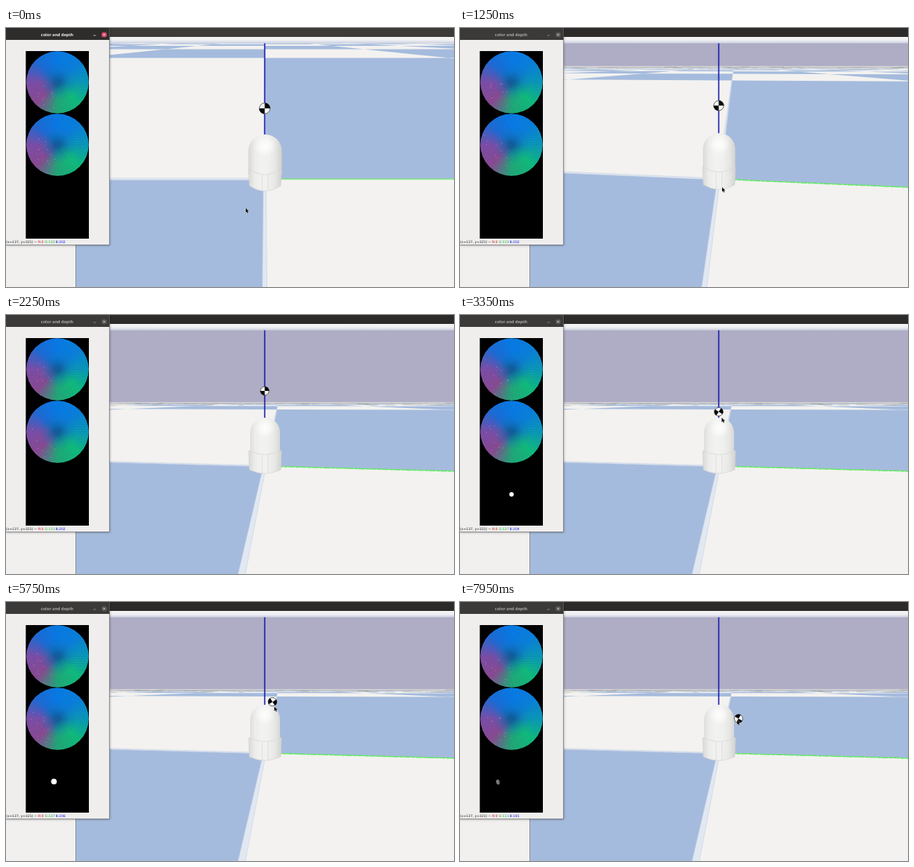
Animation, 600 px wide and 348 px high, one loop 8000 ms. Source, as an HTML page with a canvas:

```html
<!DOCTYPE html>
<html lang="en">
<head>
<meta charset="utf-8">
<title>Tactile sensor simulation</title>
<style>
html, body { margin: 0; width: 100%; height: 100%; overflow: hidden; background: #f1f0ef; }
canvas { display: block; width: 600px; height: 348px; }
</style>
</head>
<body>
<canvas id="stage" width="600" height="348"></canvas>
<script>
const LOOP = 8000, FOCAL = 230, CX = 346.5, CY = 184, GROUND = 19, TILE = 8.4;
const ctx = document.getElementById('stage').getContext('2d');

const mix = (a, b, k) => a + (b - a) * k;
const ramp = (t, from, to) => Math.min(1, Math.max(0, (t - from) / (to - from)));
const easeOut = (t, from, to, power) => 1 - (1 - ramp(t, from, to)) ** power;

// Everything that moves, as a function of time.
function pose(t) {
  const horizon = 14.7 + 45 * easeOut(t, 900, 1720, 3) + 57.5 * ramp(t, 1720, 2200);
  const tilt = (horizon - 14.7) / 102.5;
  const roll = easeOut(t, 5200, 7950, 1.4), angle = 1.5 * roll;
  const ball = {
    x: CX + 26.6 * Math.sin(angle),
    y: 108 - 6 * easeOut(t, 900, 2200, 3) + 30 * ramp(t, 2650, 3400) + 26.6 * (1 - Math.cos(angle)),
    r: 7.5 - 1.5 * tilt,
    turn: 0.6 * ramp(t, 2650, 3400) + angle
  };
  const away = ramp(t, 3500, 4300) - ramp(t, 4700, 5200);
  const pointer = t < 2400
    ? { x: 321 + 30 * ramp(t, 300, 850), y: 242 - 96 * ramp(t, 900, 2100) }
    : { x: ball.x + 4 + 40.5 * away - 6 * roll, y: ball.y + 8 + 7 * away - 6 * roll };
  pointer.visible = t < 2100 || t > 2700;
  const touching = t >= 3250;
  return {
    horizon, tilt, ball, pointer, roll, touching,
    yaw: 0.076 * ramp(t, 300, 850),
    press: ramp(t, 3050, 3450),
    focused: t < 300,
    step: Math.floor(t / 66.7),
    green: touching ? Math.round(137 - 26 * roll ** 10) : 133,
    blue: touching ? Math.round(204 + 7 * roll - 30 * roll ** 5) : 202
  };
}

function random(seed) {
  let s = seed * 7919 + 17 >>> 0;
  return () => {
    s = Math.imul(s, 1664525) + 1013904223 >>> 0;
    return s / 4294967296;
  };
}

function rect(color, x, y, w, h) {
  ctx.fillStyle = color;
  ctx.fillRect(x, y, w, h);
}

function circle(c, color, x, y, r) {
  c.fillStyle = color;
  c.beginPath();
  c.arc(x, y, r, 0, 7);
  c.fill();
}

function text(str, x, y, color, font) {
  ctx.font = font;
  ctx.fillStyle = color;
  ctx.fillText(str, x, y);
}

function spread(gradient, colors) {
  colors.forEach((color, i) => gradient.addColorStop(i / (colors.length - 1), color));
  return gradient;
}

// Orbit camera; the sensor's foot keeps its height on screen.
function makeCamera(horizon, yaw) {
  const pitch = Math.atan((CY - horizon) / FOCAL);
  const sp = Math.sin(pitch), cp = Math.cos(pitch), sy = Math.sin(yaw), cy = Math.cos(yaw);
  const drop = GROUND / (FOCAL * cp - GROUND * sp);
  return ([x, d]) => {
    const f = d * cy - x * sy;
    return [x * cy + d * sy, f * sp - drop * cp, 1 + f * cp + drop * sp];
  };
}

const project = ([x, y, z]) => [CX + FOCAL * x / z, CY - FOCAL * y / z];

function groundPoly(camera, x0, d0, x1, d1) {
  const near = 0.06, out = [];
  const pts = [[x0, d0], [x1, d0], [x1, d1], [x0, d1]].map(camera);
  pts.forEach((a, i) => {
    const b = pts[(i + 1) % pts.length];
    if (a[2] >= near) out.push(a);
    if ((a[2] >= near) !== (b[2] >= near)) {
      const k = (near - a[2]) / (b[2] - a[2]);
      out.push(a.map((v, n) => mix(v, b[n], k)));
    }
  });
  ctx.beginPath();
  out.map(project).forEach(p => ctx.lineTo(...p));
  ctx.closePath();
}

function drawGround({ horizon, yaw, step }) {
  const camera = makeCamera(horizon, yaw);
  rect('#aeadc5', 93, 20, 507, 328);
  rect('#f3f2f0', 93, horizon, 507, 348 - horizon);
  ctx.fillStyle = '#a5bbdd';
  for (let j = -1; j < 11; j++) {
    for (let i = -12; i < 12; i++) {
      if ((i + j) % 2) continue;
      groundPoly(camera, i * TILE, j * TILE, (i + 1) * TILE, (j + 1) * TILE);
      ctx.fill();
    }
  }
  ctx.lineWidth = 0.6;
  ctx.strokeStyle = '#c5d0e5';
  ctx.fillStyle = '#e2e8f1';
  const w = 0.008;
  for (const seam of [[-w, -2, w, TILE], [-TILE, -w, 0, w]]) {
    groundPoly(camera, ...seam);
    ctx.fill();
    ctx.stroke();
  }
  // Aliased tiles near the horizon.
  const rnd = random(Math.round(horizon));
  rect('rgba(160,160,160,.6)', 93, horizon + 0.5, 507, 1.6);
  for (let x = 93; x < 600; x += 4 + rnd() * 8) {
    const grey = 130 + rnd() * 90;
    rect(`rgba(${grey},${grey},${grey - 8},.6)`, x, horizon + 0.5 + rnd() * 3, 6 + rnd() * 14, 0.8);
  }
  ctx.strokeStyle = yaw ? '#5cec5c' : '#7ee87e';
  ctx.lineWidth = 1.5;
  ctx.setLineDash(yaw ? [9, 1, 5, 0.7] : []);
  ctx.lineDashOffset = step % 3;
  ctx.beginPath();
  ctx.moveTo(...project(camera([0.07, 0])));
  ctx.lineTo(...project(camera([1.5, 0])));
  ctx.stroke();
  ctx.setLineDash([]);
}

function drawSensor(tilt) {
  const x = CX + 0.5, top = mix(143, 138, tilt), r = mix(22.5, 20, tilt);
  const collar = mix(189, 182, tilt), base = mix(212, 208, tilt), bulge = mix(16, 11, tilt);
  const shade = spread(ctx.createLinearGradient(x - 23, 0, x + 23, 0),
    ['#d6d6d4', '#ececea', '#f2f2f0', '#f0f0ee', '#e6e6e4', '#cfcfcd']);
  ctx.fillStyle = shade;
  ctx.beginPath();
  ctx.arc(x, top + r, r, Math.PI, 0);
  ctx.lineTo(x + r, collar + 8);
  ctx.lineTo(x - r, collar + 8);
  ctx.fill();
  circle(ctx, spread(ctx.createRadialGradient(x, top + r * 0.7, 1, x, top + r * 0.7, r * 0.7),
    ['rgba(255,255,255,.85)', 'rgba(252,252,251,.6)', 'rgba(245,245,244,0)']), x, top + r * 0.7, r * 0.7);

  ctx.fillStyle = shade;
  ctx.strokeStyle = '#d2d2d0';
  ctx.lineWidth = 0.6;
  ctx.beginPath();
  ctx.moveTo(x - 22, collar);
  ctx.quadraticCurveTo(x, collar + bulge, x + 22, collar);
  ctx.lineTo(x + 21, base);
  ctx.quadraticCurveTo(x, base + bulge * 0.9, x - 21, base);
  ctx.closePath();
  ctx.fill();
  ctx.stroke();
  ctx.beginPath();
  for (const dx of [-4, 4]) {
    ctx.moveTo(x + dx, collar + bulge / 2);
    ctx.lineTo(x + dx, base + bulge * 0.4);
  }
  ctx.stroke();
}

function drawBall({ x, y, r, turn }) {
  circle(ctx, '#f5f5f5', x, y, r);
  ctx.fillStyle = '#080808';
  for (const side of [-0.5, 0.5]) {
    const start = side * Math.PI + turn;
    ctx.beginPath();
    ctx.moveTo(x, y);
    ctx.arc(x, y, r, start, start + Math.PI / 2);
    ctx.fill();
  }
  ctx.strokeStyle = '#222';
  ctx.lineWidth = 0.7;
  ctx.beginPath();
  ctx.arc(x, y, r - 0.3, 0, 7);
  ctx.stroke();
}

function drawPointer({ x, y }) {
  ctx.beginPath();
  [[0, 0], [0, 6], [1.4, 4.8], [2.4, 7], [3.4, 6.5], [2.5, 4.4], [4.3, 4.3]]
    .forEach(([dx, dy]) => ctx.lineTo(x + dx, y + dy));
  ctx.closePath();
  ctx.lineWidth = 0.9;
  ctx.strokeStyle = '#eee';
  ctx.stroke();
  ctx.fillStyle = '#111';
  ctx.fill();
}

function makeDisc() {
  const c = document.createElement('canvas');
  c.width = c.height = 84;
  const g = c.getContext('2d');
  circle(g, spread(g.createConicGradient(-Math.PI / 2, 42, 42),
    ['#087be6', '#0a80dc', '#0b98b8', '#10bc7c', '#22a878', '#8a4a92', '#7c4ea8', '#1c6cd6', '#087be6']),
    42, 42, 41.7);
  circle(g, spread(g.createRadialGradient(42, 42, 3, 42, 42, 25),
    ['rgba(18,92,155,.95)', 'rgba(16,104,170,.6)', 'rgba(20,115,185,.25)', 'rgba(30,110,180,0)']),
    42, 42, 25);
  for (let r = 4; r < 41; r += 2.5) {
    const n = Math.round(r * 1.9);
    for (let i = 0; i < n; i++) {
      const a = i / n * 2 * Math.PI;
      circle(g, 'rgba(0,45,90,.17)', 42 + r * Math.cos(a), 42 + r * Math.sin(a), 0.65);
    }
  }
  return c;
}
const disc = makeDisc();

function drawSpeckle(cy, seed) {
  const rnd = random(seed);
  for (let i = 0; i < 30; i++) {
    const a = 1.7 + rnd() * 1.8, r = 13 + rnd() * 27;
    rect(i % 3 ? 'rgba(190,75,165,.45)' : 'rgba(215,185,235,.55)',
      69 + r * Math.cos(a), cy + r * Math.sin(a), 1, 1);
  }
}

// Contact patch: it slides left, narrows and fades as the ball rolls off.
function drawContact({ roll, press }) {
  const x = 69 - 18 * roll, y = 241 + roll, rx = (3.9 - 1.4 * roll ** 2) * press;
  const level = Math.round(255 - 125 * roll ** 6), edge = Math.round(level * (1 - 0.5 * roll ** 3));
  ctx.fillStyle = spread(ctx.createLinearGradient(x - rx, 0, x + rx, 0),
    [level, level, edge].map(v => `rgb(${v},${v},${v})`));
  ctx.beginPath();
  ctx.ellipse(x, y, rx, (3.9 - 0.5 * roll) * press, -0.3 * roll, 0, 7);
  ctx.fill();
}

function drawPanel(p) {
  const { focused } = p;
  rect('#f1f0ef', 0, 291, 93, 57);
  rect('#85858a', 93, 291, 0.8, 57);
  ctx.save();
  ctx.shadowColor = 'rgba(0,0,0,.4)';
  ctx.shadowBlur = 3;
  rect('#77767a', 0, 0, 139, 291.6);
  ctx.restore();
  rect('#efeeed', 0, 16, 138.2, 275);
  rect(focused ? '#2e2d2b' : '#3b3a38', 0, 0, 138.5, 16);
  ctx.textAlign = 'center';
  text('color and depth', 68.5, 11.2, focused ? '#f2f1ef' : '#aaa9a5', 'bold 5.5px "Noto Sans", sans-serif');
  ctx.textAlign = 'left';
  rect(focused ? '#ddd' : '#96958f', 117, 9.6, 3.2, 0.8);
  circle(ctx, focused ? '#da4569' : '#565551', 131.5, 9, 3.6);
  ctx.strokeStyle = focused ? '#fff' : '#deddda';
  ctx.lineWidth = 0.8;
  ctx.beginPath();
  for (const s of [1, -1]) {
    ctx.moveTo(130.2, 9 - 1.3 * s);
    ctx.lineTo(132.8, 9 + 1.3 * s);
  }
  ctx.stroke();

  rect('#000', 26.5, 31, 84.5, 252);
  [73, 157].forEach((y, i) => {
    ctx.drawImage(disc, 27, y - 42);
    drawSpeckle(y, p.step * 2 + i);
  });
  if (p.touching) drawContact(p);

  const font = '4.5px "DejaVu Sans", sans-serif';
  text('(x=137, y=321) ~', 0, 289.2, '#222', font);
  text('R:0', 43, 289.2, '#e01020', font);
  text(`G:${p.green}`, 52, 289.2, '#16b030', font);
  text(`B:${p.blue}`, 66.5, 289.2, '#1818e8', font);
}

function draw(t) {
  const p = pose(t);
  ctx.save();
  ctx.beginPath();
  ctx.rect(93, 20, 507, 328);
  ctx.clip();
  drawGround(p);
  rect('#1a1aae', 345.7, 20, 1.6, 126 - 5 * p.tilt);
  drawSensor(p.tilt);
  drawBall(p.ball);
  if (p.pointer.visible) drawPointer(p.pointer);
  ctx.restore();
  rect(p.focused ? '#3c3b38' : '#2c2b29', 138, 0, 462, 12);
  rect(spread(ctx.createLinearGradient(0, 12, 0, 20.5), ['#f5f4f3', '#eff0f3', '#cbd1e0']), 138, 12, 462, 8.5);
  drawPanel(p);
}

const begin = performance.now();
function frame() {
  draw((performance.now() - begin) % LOOP);
  requestAnimationFrame(frame);
}
frame();
</script>
</body>
</html>
```
